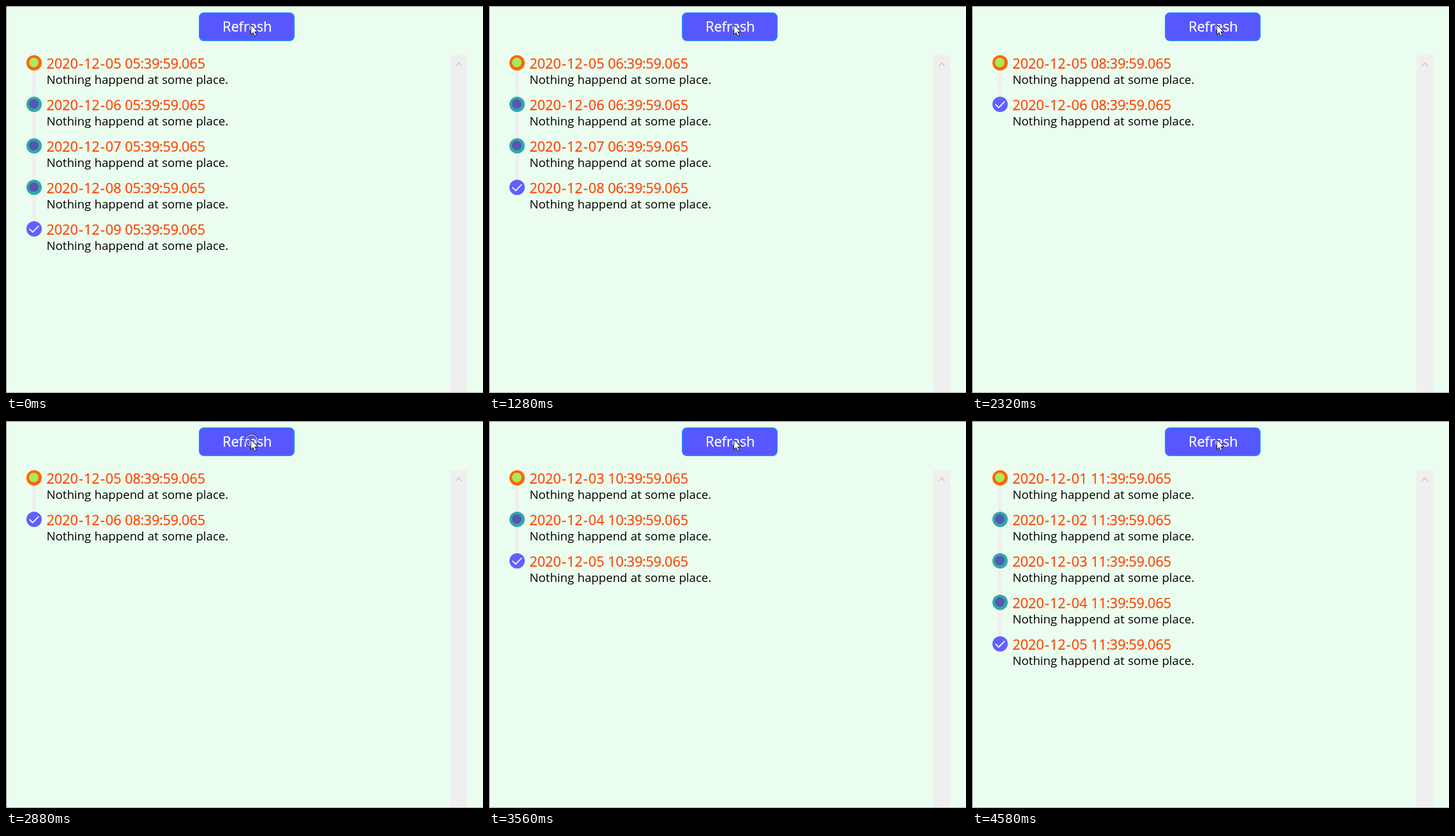
Write an HTML page that moves like this. It is 747 by 606 pixels and loops after 4880 ms.

```html
<!DOCTYPE html>
<html lang="en">
<head>
<meta charset="utf-8">
<title>Timeline</title>
<style>
  html, body { margin: 0; width: 100%; height: 100%; overflow: hidden; background: #ebfdee; }
  svg { display: block; font-family: "Open Sans", "Noto Sans", sans-serif; }
  .date { font-size: 21.6px; fill: #ff4500; stroke: #ff4500; stroke-width: .25px; }
  .note { font-size: 18.65px; fill: #000; word-spacing: .5px; }
  .label { font-size: 21.8px; fill: #fff; text-anchor: middle; stroke: #fff; stroke-width: .25px; }
  .stroke { fill: none; stroke-linecap: round; stroke-linejoin: round; }
</style>
</head>
<body>
<svg width="747" height="606" viewBox="0 0 747 606">
  <rect x="696" y="77" width="26" height="528" fill="#efeff0"/>
  <path d="M704.5 94l4.5-5 4.5 5" fill="none" stroke="#d2d2d2" stroke-width="2"/>
  <path d="M0 .5H747M.5 0V606" stroke="#808080"/>
  <path d="M0 605.5H747" stroke="#a4aca6"/>
  <rect x="302.75" y="10.75" width="148.5" height="43.5" rx="7" fill="#5757ff" stroke="#1e90ff" stroke-width="1.5"/>
  <text class="label" x="377.7" y="40">Refresh</text>
  <g id="list"></g>
  <g id="ring" fill="none">
    <circle cx="384.5" cy="30.5" r="10" stroke="#111"/>
    <circle cx="384.5" cy="30.5" r="9" stroke="#fff"/>
  </g>
  <path d="M383.5 29.5v15.3l3.5-3.3 2.4 5.4 2.7-1.2-2.4-5.2h4.8z" fill="#fff" stroke="#111"/>
</svg>
<script>
const LOOP = 4880;
const ROW = 65;

// Each refresh: start time, hour, first day, number of entries
const states = [
  [0, 5, 5, 5],
  [1280, 6, 5, 4],
  [1740, 7, 5, 3],
  [2320, 8, 5, 2],
  [3000, 9, 5, 1],
  [3560, 10, 3, 3],
  [4580, 11, 1, 5],
];
const clicks = [[1130, 1280], [2170, 2320], [2880, 3000], [4430, 4580]];

const list = document.getElementById("list");
const ring = document.getElementById("ring");
const pad = n => String(n).padStart(2, "0");
const disc = (r, fill, x = 44, y = 89) => `<circle cx="${x}" cy="${y}" r="${r}" fill="${fill}"/>`;
const stroke = (d, color, width) =>
  `<path class="stroke" d="${d}" stroke="${color}" stroke-width="${width}"/>`;
const dot = (outer, inner) => disc(12, outer) + disc(7.5, inner, 43.5, 88.5);

// Loosen the hyphens and tighten the colons and the decimal point
const kern = text => text.replace(/([-:.])(\d)/g, (_, mark, digit) => {
  const gap = mark === "-" ? 1.1 : -0.4;
  return `<tspan dx="${gap}">${mark}</tspan><tspan dx="${gap}">${digit}</tspan>`;
});

function marker(i, count) {
  if (count === 1) return disc(12, "#e8ae88") + stroke("M38 89H50", "#f4604c", 2.6);
  if (i === 0) return dot("#ff6600", "#a6ea62");
  if (i < count - 1) return dot("#32a8a8", "#5656b4");
  return disc(12, "#6060ff") + stroke("M37 89.3l4.8 4.8 9-9.3", "#fff", 1.7);
}

function entry(i, [, hour, day, count]) {
  const link = i < count - 1 ? '<rect x="41" y="89" width="6" height="65" fill="#f0eef1"/>' : "";
  return `<g transform="translate(0 ${i * ROW})">${link}${marker(i, count)}
    <text class="date" x="63.4" y="98">${kern(`2020-12-${pad(day + i)} ${pad(hour)}:39:59.065`)}</text>
    <text class="note" x="63.5" y="122">Nothing happend at some place.</text></g>`;
}

let shown;
function draw() {
  const t = performance.now() % LOOP;
  const state = states.findLast(([start]) => start <= t);
  if (state !== shown) {
    shown = state;
    list.innerHTML = Array.from({ length: state[3] }, (_, i) => entry(i, state)).join("");
  }
  const pressed = clicks.some(([from, to]) => t >= from && t < to);
  ring.setAttribute("visibility", pressed ? "visible" : "hidden");
  requestAnimationFrame(draw);
}
draw();
</script>
</body>
</html>
```
